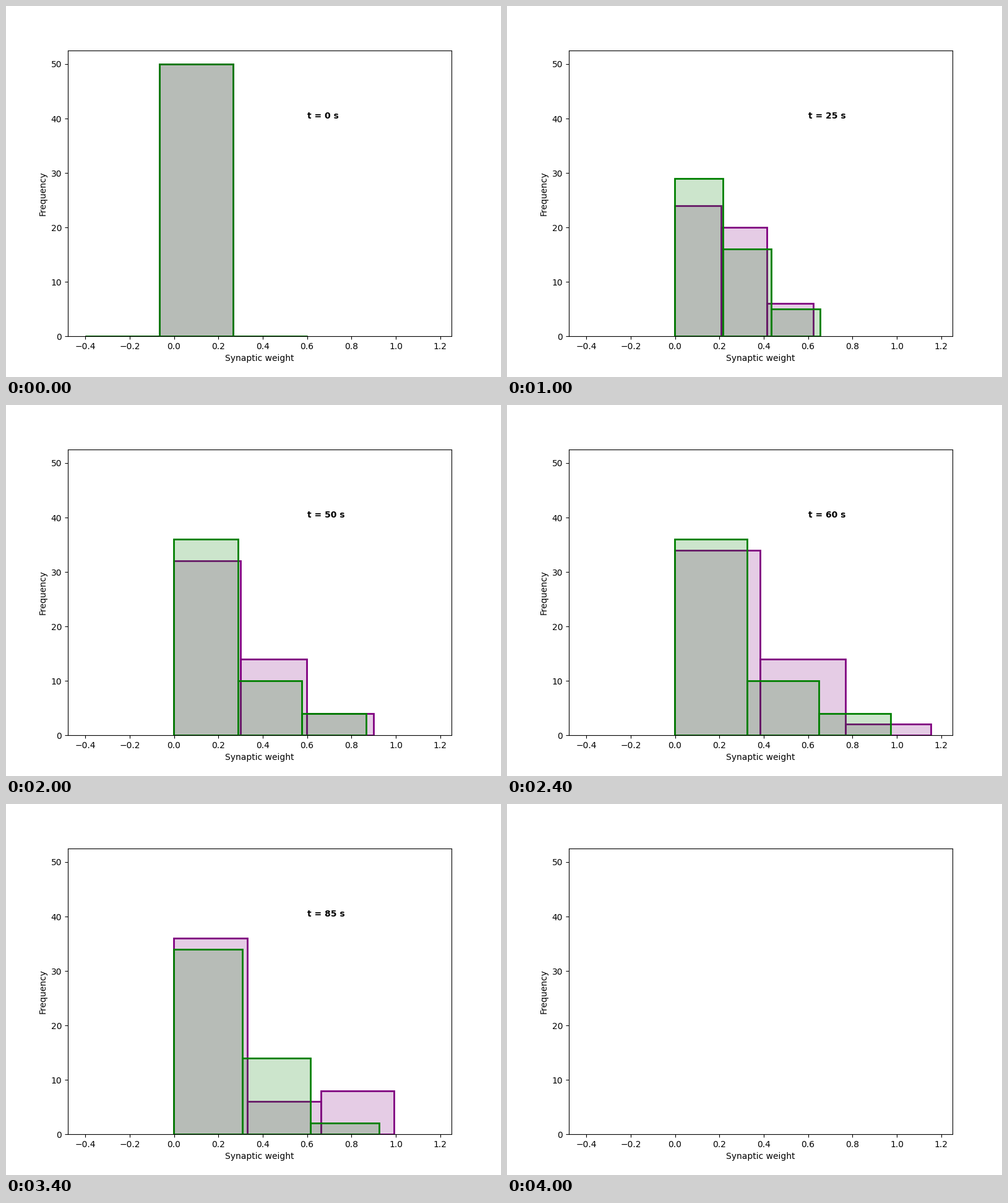
These frames come from a looping animation (800x600 px, 4.2 s). A matplotlib script:

```python
import numpy as np
import matplotlib.pyplot as plt
from matplotlib.animation import FuncAnimation

CELLS = 50
STEP_SECONDS = 5
FRAMES = 21
LOWEST, INITIAL, HIGHEST = -0.001, 0.1, 1.1725

# Key points by step: largest weight ("reach") and counts of the first two bins.
PURPLE = {
    "reach": {0: INITIAL, 3: 0.493, 5: 0.6235, 8: 0.8235, 10: 0.9, 12: 1.154,
              13: HIGHEST, 15: 1.006, 17: 0.9925, 19: 1.042},
    "first": {0: 8, 3: 21, 5: 24, 8: 31, 12: 34, 17: 36},
    "second": {0: 27, 3: 20, 5: 20, 8: 13, 12: 14, 17: 6},
}
GREEN = {
    "reach": {0: INITIAL, 3: 0.427, 5: 0.653, 8: 0.759, 12: 0.9735,
              15: 0.837, 17: 0.9245},
    "first": {0: 8, 3: 17, 5: 29, 8: 35, 12: 36, 17: 34},
    "second": {0: 27, 3: 23, 5: 16, 8: 10, 12: 10, 17: 14},
}

fig, ax = plt.subplots(figsize=(8, 6), dpi=100)
margin = 0.05 * (HIGHEST + 0.4)
ax.set_xlim(-0.4 - margin, HIGHEST + margin)
ax.set_ylim(0, 1.05 * CELLS)
ax.set_xlabel("Synaptic weight")
ax.set_ylabel("Frequency")
clock = ax.text(0.6, 40, "", fontweight="bold")


def make_bars(color):
    return ax.bar([0, 0, 0], [0, 0, 0], align="edge", linewidth=2,
                  facecolor=(color, 0.2), edgecolor=color)


def at(step, keys):
    return np.interp(step, list(keys), list(keys.values()))


def histogram(step, population):
    if step == 0:
        # Equal weights all fall into the middle of a unit-wide range.
        return np.linspace(INITIAL - 0.5, INITIAL + 0.5, 4), (0, CELLS, 0)
    edges = np.linspace(LOWEST, at(step, population["reach"]), 4)
    first = round(at(step, population["first"]))
    second = round(at(step, population["second"]))
    return edges, (first, second, CELLS - first - second)


layers = [(make_bars("purple"), PURPLE), (make_bars("green"), GREEN)]


def update(step):
    visible = step < FRAMES - 1
    clock.set_visible(visible)
    clock.set_text(f"t = {step * STEP_SECONDS} s")
    for bars, population in layers:
        edges, counts = histogram(step, population)
        for bar, left, right, count in zip(bars, edges, edges[1:], counts):
            bar.set_bounds(left, 0, right - left, count)
            bar.set_visible(visible)


animation = FuncAnimation(fig, update, frames=FRAMES, interval=200,
                          repeat=True, repeat_delay=0, blit=False)
plt.show()
```
